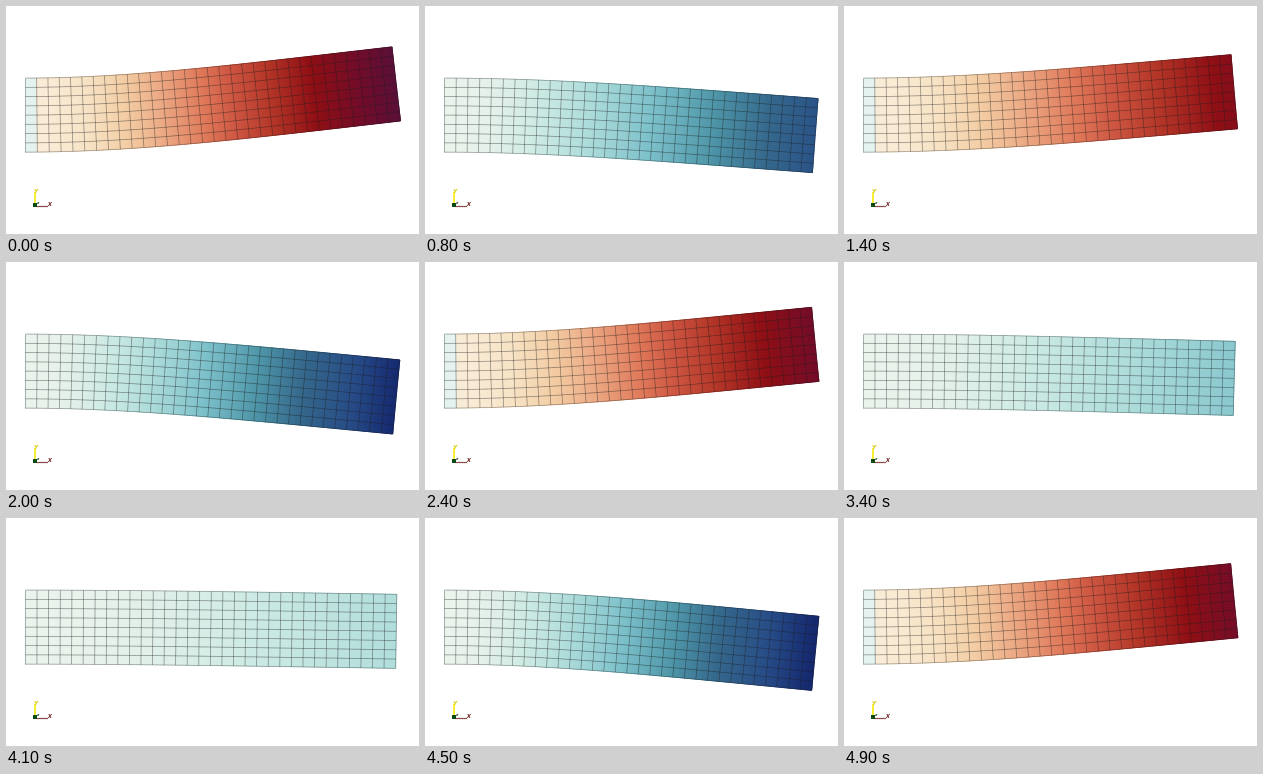
Recreate the animation shown at these times as a matplotlib script. Size 413 by 228 pixels, loop 5000 ms.

```python
import numpy as np
import matplotlib.pyplot as plt
from matplotlib.animation import FuncAnimation
from matplotlib.collections import LineCollection
from matplotlib.colors import LinearSegmentedColormap

W, H, DPI = 413, 228, 64
PX = 72 / DPI                      # points per pixel
FRAMES, INTERVAL = 50, 100

LEFT, TOP, LENGTH, HEIGHT = 19.4, 72.1, 370.8, 74
COLS, ROWS = 32, 8
AMPLITUDE = 31.2                   # tip deflection in pixels
STEP, PHASE = np.radians(28.75), np.radians(-1)
LIMIT = 32

# Colour by vertical deflection in pixels
STOPS = [
    (-32, "#0d1450"), (-26, "#15296f"), (-22, "#264a86"), (-17, "#35688c"),
    (-12.7, "#4f97a9"), (-8.4, "#7cc0ca"), (-4.8, "#a9dad9"), (-2, "#cdeae4"),
    (-0.2, "#e8f2eb"), (0, "#eaf3ec"), (0, "#e5f3f0"), (0.05, "#e5f3f0"),
    (0.05, "#f9ecd7"), (1.4, "#f7e3c5"), (3.5, "#f3cda4"), (6.8, "#eaa17d"),
    (10, "#df7859"), (13, "#cd5541"), (17, "#b33527"), (21.7, "#8f0f15"),
    (27, "#720c2a"), (32, "#56103a"),
]
CMAP = LinearSegmentedColormap.from_list(
    "deflection", [((v + LIMIT) / (2 * LIMIT), c) for v, c in STOPS], N=4096)


def mode(s):
    """First bending mode of a cantilever and its slope, with unit tip value."""
    k, r = 1.8751, 0.7341
    a = k * s
    shape = np.cosh(a) - np.cos(a) - r * (np.sinh(a) - np.sin(a))
    slope = k * (np.sinh(a) + np.sin(a) - r * (np.cosh(a) - np.cos(a)))
    return shape / 2, slope / 2


def deform(s, t, tip):
    """Screen position of the beam point at fractions s along and t down."""
    shape, slope = mode(s)
    x = LEFT + s * LENGTH + (t - 0.5) * HEIGHT * tip * slope / LENGTH
    return x, TOP + t * HEIGHT - tip * shape


def polyline(s, t, tip):
    return np.column_stack(deform(s, t, tip))


fig = plt.figure(figsize=(W / DPI, H / DPI), dpi=DPI, facecolor="white")
ax = fig.add_axes([0, 0, 1, 1])

along, down = np.linspace(0, 1, 321), np.linspace(0, 1, 2)
S, T = np.meshgrid(along, down)
smooth = np.linspace(0, 1, 65)


def draw_mesh(tip):
    rows = [polyline(smooth, np.full_like(smooth, j / ROWS), tip)
            for j in range(ROWS + 1)]
    cols = [polyline(np.full(2, i / COLS), down, tip)
            for i in range(COLS + 1)]
    inner = rows[1:-1] + cols[1:-1]
    outline = [rows[0], rows[-1], cols[0], cols[-1]]
    for lines, width, alpha in ((inner, 0.75, 0.46), (outline, 0.7, 0.42)):
        ax.add_collection(LineCollection(lines, colors="#1c1c1c", alpha=alpha,
                                         linewidths=width * PX), autolim=False)


def draw_axes_marker():
    ax.plot([28.8, 28.8], [198, 187], color="#f5ea00", lw=1.6 * PX)
    ax.plot([30, 41], [199.5, 199.5], color="#8a4a4a", lw=1.2 * PX)
    ax.plot([28.8], [199.4], "s", color="#0c4a10", ms=3.2 * PX, mew=0)
    label = dict(ha="center", va="center", family="DejaVu Sans",
                 weight="bold", style="italic")
    ax.text(29.9, 185.4, "Y", color="#d8cc00", fontsize=6 * PX, **label)
    ax.text(42.8, 198.9, "X", color="#6a1818", fontsize=5 * PX, **label)
    ax.text(31, 197, "z", color="#2c4a2c", fontsize=4 * PX, **label)


def draw(frame):
    ax.clear()
    ax.set_axis_off()
    tip = AMPLITUDE * np.cos(PHASE + STEP * frame)
    x, y = deform(S, T, tip)
    ax.pcolormesh(x, y, tip * mode(S)[0], cmap=CMAP, vmin=-LIMIT, vmax=LIMIT,
                  shading="gouraud")
    draw_mesh(tip)
    draw_axes_marker()
    ax.set(xlim=(0, W), ylim=(H, 0))
    return []


anim = FuncAnimation(fig, draw, frames=FRAMES, interval=INTERVAL,
                     init_func=lambda: [], repeat=True, repeat_delay=0)
plt.show()
```
